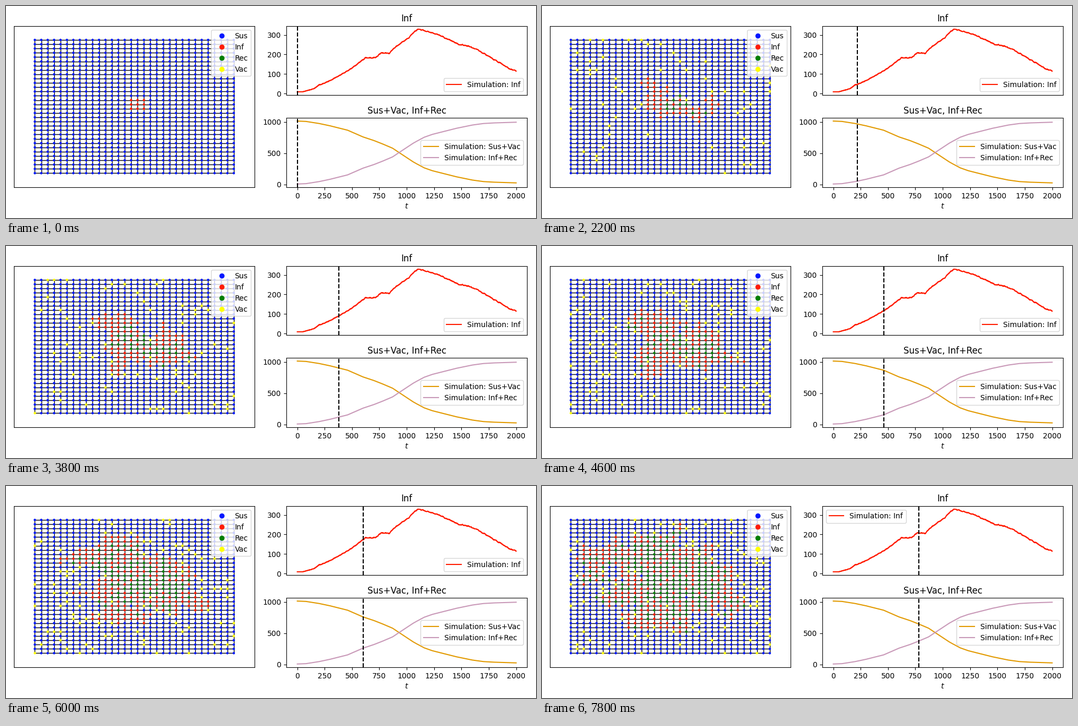
Animation, 1000 px wide and 400 px high, one loop 8000 ms. Source, as a matplotlib script:

```python
import matplotlib.pyplot as plt
import numpy as np
from matplotlib.animation import FuncAnimation
from matplotlib.collections import LineCollection
from matplotlib.lines import Line2D

W, H, DPI = 1000, 400, 100
SIDE = 32
FRAMES, STEP = 40, 20
SUS, INF, REC, VAC = range(4)
PALETTE = np.array(["#0018ff", "#ff1c00", "#008000", "#ffff00"])
ORANGE, PINK = "#e29a00", "#c999b8"
VACCINATE, WANE = 0.011, 0.11  # chances per step
rng = np.random.default_rng(7)

# Key points of the curves as (time, count)
ILL_KEYS = [
    (0, 9), (50, 9), (150, 25), (200, 44), (300, 66), (420, 104), (500, 132),
    (620, 182), (710, 183), (770, 209), (840, 207), (890, 234), (960, 263),
    (1010, 282), (1075, 320), (1110, 330), (1190, 318), (1300, 298),
    (1440, 262), (1480, 250), (1560, 243), (1640, 227), (1860, 154),
    (1930, 129), (2000, 116),
]
EVER_KEYS = [
    (0, 9), (80, 15), (200, 48), (300, 85), (460, 155), (600, 262),
    (700, 320), (780, 375), (870, 442), (930, 512), (1065, 668), (1160, 757),
    (1235, 803), (1455, 900), (1600, 952), (1700, 976), (1800, 986),
    (2000, 997),
]


def series(keys):
    return np.interp(time, *zip(*keys))


time = np.arange(2001)
wobble = np.convolve(rng.normal(0, 0.3, time.size), np.ones(14), "same")
ill = np.rint(series(ILL_KEYS) + wobble * np.minimum(time / 300, 1))
ever = np.rint(series(EVER_KEYS))


def contacts(sick):
    """Number of sick neighbours of each site."""
    p = np.pad(sick.astype(int), 1)
    return p[:-2, 1:-1] + p[2:, 1:-1] + p[1:-1, :-2] + p[1:-1, 2:]


def simulate():
    """Lattice epidemic whose totals follow the two curves."""
    grid = np.zeros((SIDE, SIDE), int)
    grid[14:17, 15:18] = INF
    row, col = np.indices(grid.shape)
    lean = np.exp(-0.04 * col - 0.02 * row)  # spreads faster to upper left
    states = [grid.ravel().copy()]
    for t in range(STEP, FRAMES * STEP, STEP):
        draw = rng.random(grid.shape)
        waning = (grid == VAC) & (draw < WANE)
        grid[(grid == SUS) & (draw < VACCINATE)] = VAC
        grid[waning] = SUS

        while np.sum((grid == INF) | (grid == REC)) < ever[t]:
            risk = contacts(grid == INF) * lean * (grid == SUS)
            new = rng.choice(grid.size, p=risk.ravel() / risk.sum())
            grid.flat[new] = INF

        sick = np.flatnonzero(grid == INF)
        cured = max(sick.size - int(ill[t]), 0)
        grid.flat[rng.choice(sick, cured, replace=False)] = REC
        states.append(grid.ravel().copy())
    return states


fig = plt.figure(figsize=(W / DPI, H / DPI), dpi=DPI)


def add_axes(x0, y0, x1, y1):
    return fig.add_axes([x0 / W, 1 - y1 / H, (x1 - x0) / W, (y1 - y0) / H])


# Lattice
last = SIDE - 1
pad = 0.105 * last
net = add_axes(15, 37.6, 469.2, 341.8)
net.set(xlim=(-pad, last + pad), ylim=(last + pad, -pad), xticks=[],
        yticks=[])
edges = [[(0, k), (last, k)] for k in range(SIDE)]
edges += [[(k, 0), (k, last)] for k in range(SIDE)]
net.add_collection(LineCollection(edges, colors="k", linewidths=1, zorder=1),
                   autolim=False)
rows, cols = np.indices((SIDE, SIDE))
nodes = net.scatter(cols.ravel(), rows.ravel(), s=5, c=PALETTE[SUS],
                    linewidths=1, zorder=2)
keys = [Line2D([], [], ls="none", marker="o", color=c, label=name)
        for c, name in zip(PALETTE, ["Sus", "Inf", "Rec", "Vac"])]
net.legend(handles=keys, loc="upper right")

# Curves
top = add_axes(529, 37.6, 983.2, 168.2)
top.plot(time, ill, color=PALETTE[INF], label="Simulation: Inf")
top.set(title="Inf", xlim=(-100, 2100), ylim=(-8.1, 346.1), xticks=[],
        yticks=range(0, 301, 100))
top.legend(loc="best")

low = add_axes(529, 211.2, 983.2, 341.8)
low.plot(time, SIDE**2 - ever, color=ORANGE, label="Simulation: Sus+Vac")
low.plot(time, ever, color=PINK, label="Simulation: Inf+Rec")
low.set(title="Sus+Vac, Inf+Rec", xlabel="$t$", xlim=(-100, 2100),
        ylim=(-41.3, 1065.3), xticks=range(0, 2001, 250),
        yticks=range(0, 1001, 500))
low.legend(loc="center right")

cursors = [ax.axvline(0, color="k", ls="--") for ax in (top, low)]
states = simulate()


def update(i):
    nodes.set_facecolor(PALETTE[states[i]])
    for cursor in cursors:
        cursor.set_xdata([i * STEP] * 2)
    return [nodes, *cursors]


anim = FuncAnimation(fig, update, frames=FRAMES, interval=200, repeat=True)
plt.show()
```
